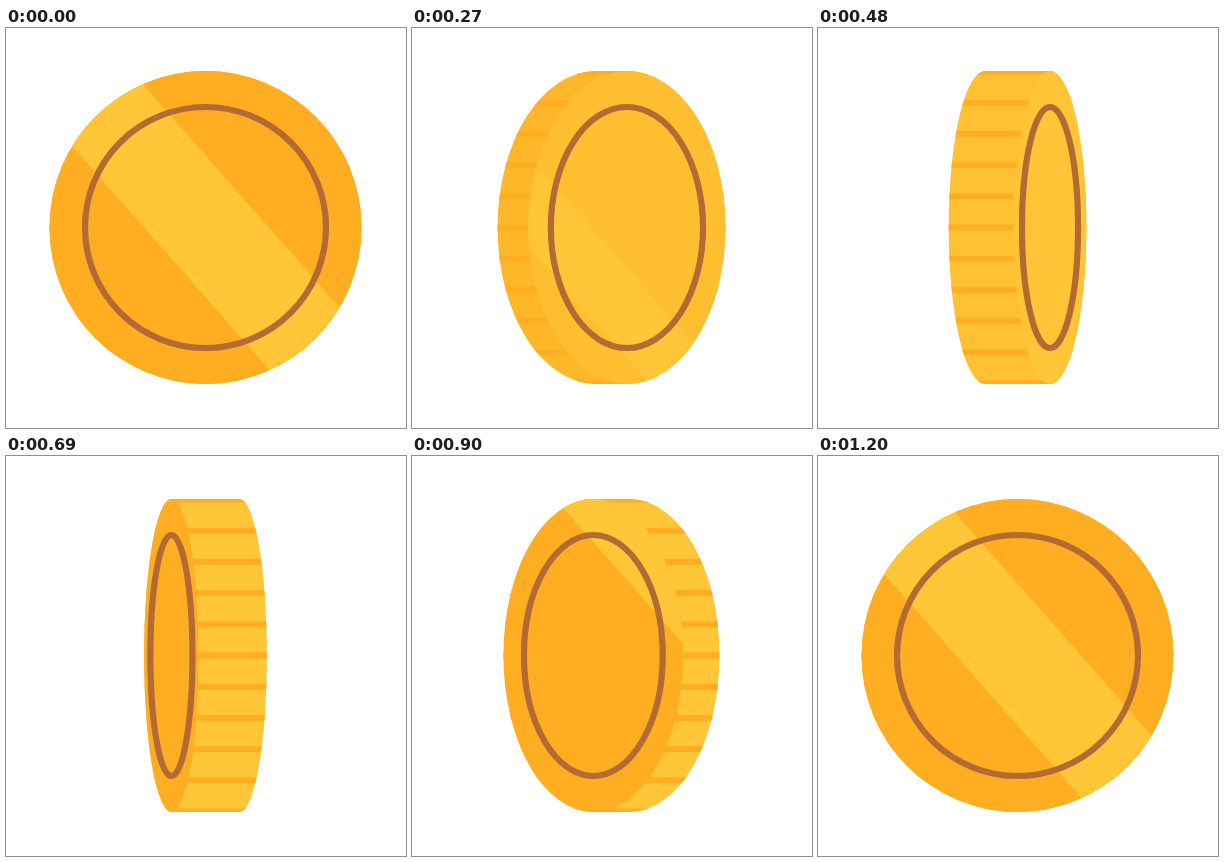
Animation, 400 px wide and 400 px high, one loop 1230 ms. Source, as an HTML page with a canvas:

```html
<!DOCTYPE html>
<html lang="en">
<head>
<meta charset="utf-8">
<title>Spinning coin</title>
<style>
  html, body { margin: 0; height: 100%; overflow: hidden; background: #fff; }
  canvas { display: block; width: 100vmin; height: 100vmin; }
</style>
</head>
<body>
<canvas id="stage" width="400" height="400"></canvas>
<script>
const ctx = document.getElementById('stage').getContext('2d');
const CENTER = 199.5, RX = 156, RY = 156.5, RING = 120.5;
const STEP = 30, LOOP = 1230, HALF = 600;
const DARK = [255, 174, 34], LIGHT = [255, 198, 55], BROWN = '#b36a33';

const mix = amount =>
  `rgb(${DARK.map((c, i) => Math.round(c + (LIGHT[i] - c) * amount))})`;

// Short soft start, then nearly constant speed
const softStart = s => {
  const a = 0.17;
  return (Math.hypot(s, a) - a) / (Math.hypot(1, a) - a);
};
const smooth = s => s * s * (3 - 2 * s);

function ellipse(x, rx, ry) {
  ctx.beginPath();
  ctx.ellipse(x, CENTER, rx, ry, 0, 0, 2 * Math.PI);
}

function drawRim(rx, depth, color) {
  ctx.save();
  ctx.beginPath();
  for (const x of [CENTER - depth, CENTER + depth]) {
    ctx.moveTo(x + rx, CENTER);
    ctx.ellipse(x, CENTER, rx, RY, 0, 0, 2 * Math.PI);
  }
  ctx.rect(CENTER - depth, CENTER - RY, 2 * depth, 2 * RY);
  ctx.clip();
  ctx.fillStyle = color;
  ctx.fillRect(0, 0, 400, 400);
  ctx.fillStyle = mix(0);
  for (let i = -5; i <= 5; i++) ctx.fillRect(0, CENTER + i * 31.2 - 3, 400, 6);
  ctx.restore();
}

function drawFace(x, scale, color, shineX) {
  ctx.save();
  ellipse(x, RX * scale, RY);
  ctx.clip();
  ctx.fillStyle = color;
  ctx.fillRect(0, 0, 400, 400);

  // Diagonal shine, narrowing with the face
  const w = 62.5 * scale, reach = 200, lean = reach / 1.135, mid = x + shineX;
  ctx.fillStyle = mix(1);
  ctx.beginPath();
  ctx.moveTo(mid - w - lean, CENTER - reach);
  ctx.lineTo(mid + w - lean, CENTER - reach);
  ctx.lineTo(mid + w + lean, CENTER + reach);
  ctx.lineTo(mid - w + lean, CENTER + reach);
  ctx.fill();

  ctx.strokeStyle = BROWN;
  ctx.lineWidth = 6.2;
  ellipse(x, RING * scale, RING);
  ctx.stroke();
  ctx.restore();
}

function draw(now) {
  const t = Math.floor(now % LOOP / STEP) * STEP;
  const front = t < HALF;
  const s = front ? t / HALF : (2 * HALF - t) / HALF; // 0 facing, 1 edge-on
  const turn = softStart(s), scale = 1 - turn, depth = 36.3 * smooth(s);

  ctx.fillStyle = '#fff';
  ctx.fillRect(0, 0, 400, 400);
  drawRim(RX * scale, depth, mix(front ? turn : 1));
  if (scale > 0) {
    drawFace(
      CENTER + (front ? depth : -depth),
      scale,
      mix(front ? 1 - (1 - s) ** 2 : 0),
      1 + (front ? -170 * s : 318 * turn)
    );
  }
  requestAnimationFrame(tick);
}

const start = performance.now();
const tick = () => draw(performance.now() - start);
tick();
</script>
</body>
</html>
```
